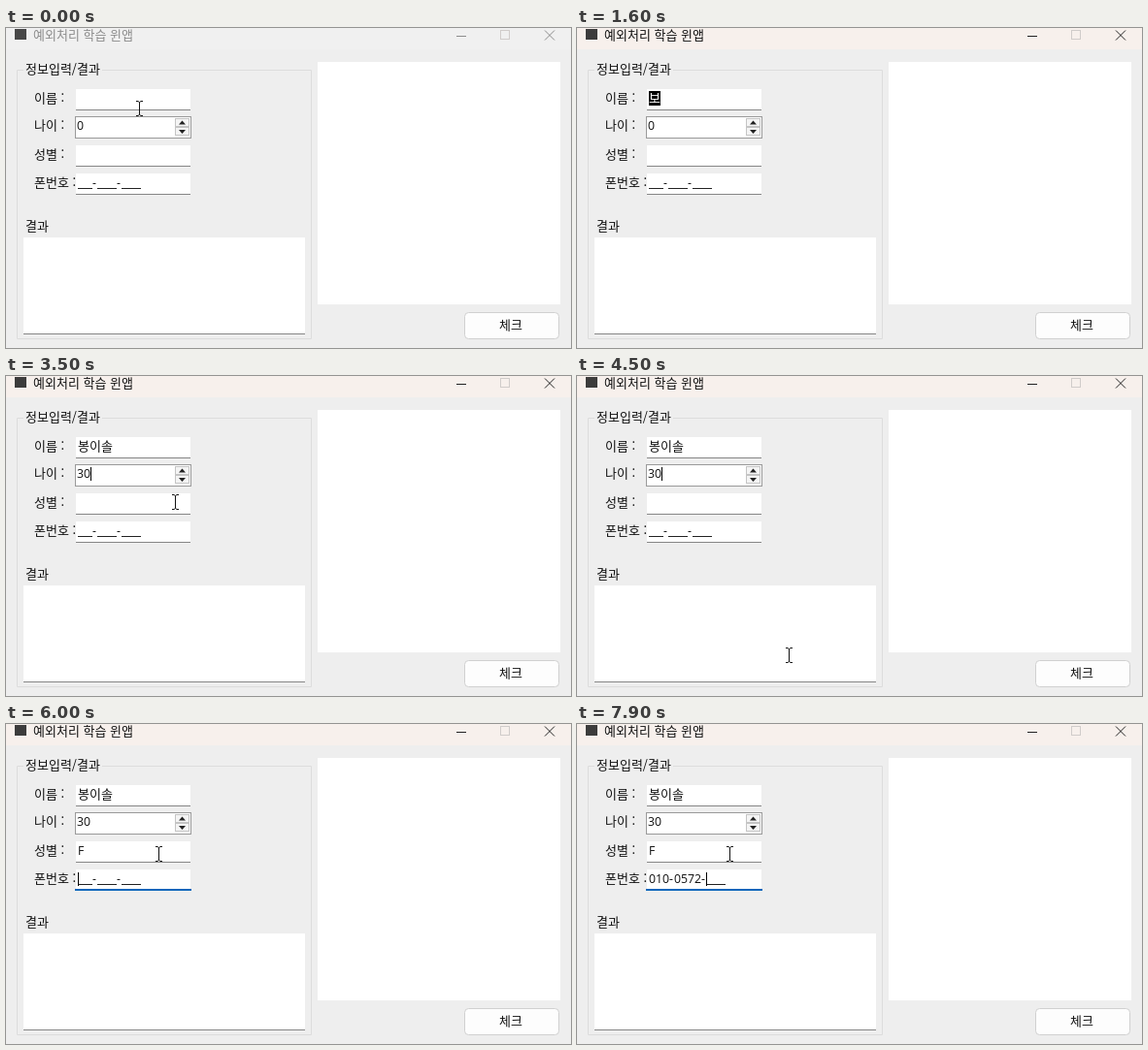
An HTML page that plays this animation: 582 by 330 pixels, repeating every 8000 ms.

```html
<!DOCTYPE html>
<html lang="ko">
<head>
<meta charset="utf-8">
<style>
  html, body { margin: 0; width: 100%; height: 100%; overflow: hidden; background: #eee; }
  svg { display: block; }
  text { font: 13px "Noto Sans CJK KR", "Noto Sans CJK", sans-serif; fill: #111; white-space: pre; }
  .num { font: 12.3px "Open Sans", "Noto Sans", sans-serif; }
  rect { shape-rendering: crispEdges; }
  .box { fill: #fff; }
  .edge { fill: #868686; }
  .line { fill: none; stroke: #111; }
</style>
</head>
<body>
<svg width="582" height="330" viewBox="0 0 582 330">
  <rect width="582" height="330" fill="#eee"/>
  <rect id="bar" width="582" height="22"/>
  <rect id="icon" x="9" y="1" width="12" height="11"/>
  <text id="title" x="28" y="12">예외처리 학습 윈앱</text>
  <g id="controls" fill="none">
    <path d="M464 8.5H474"/>
    <path d="M555 2.5L565 12.5M565 2.5L555 12.5"/>
  </g>
  <rect x="509.5" y="2.5" width="9" height="9" fill="none" stroke="#d0ccca"/>

  <path d="M18 43.5H11.5V320.5H314.5V43.5H99" fill="none" stroke="#dcdcdc"/>
  <text x="20" y="47">정보입력/결과</text>
  <text x="29" y="77">이름 :</text>
  <text x="29" y="105">나이 :</text>
  <text x="29" y="135">성별 :</text>
  <text x="29" y="164">폰번호 :</text>
  <text x="20" y="209">결과</text>

  <g id="inputs"></g>
  <rect x="71.5" y="91.5" width="119" height="22" fill="#fff" stroke="#9a9a9a"/>
  <g fill="#f4f4f4" stroke="#c4c4c4">
    <rect x="174.5" y="93.5" width="14" height="8"/>
    <rect x="174.5" y="102.5" width="14" height="8"/>
  </g>
  <path d="M178 99.5L181.5 95.5L185 99.5ZM178 105L181.5 109L185 105Z" fill="#222"/>
  <rect class="box" x="18" y="216" width="290" height="99"/>
  <rect class="edge" x="18" y="315" width="290" height="1"/>
  <rect class="box" x="321" y="35" width="250" height="250"/>
  <rect x="472.5" y="293.5" width="97" height="27" rx="4" fill="#fdfdfd" stroke="#d0d0d0" style="shape-rendering:auto"/>
  <text x="508" y="311">체크</text>

  <rect id="focus" x="71" width="120" height="2" fill="#0b66bb"/>
  <text id="name" x="74" y="77"></text>
  <rect id="block" y="65" width="12" height="15" fill="#000"/>
  <text id="jamo" y="77" style="fill:#fff"></text>
  <text id="age" class="num" x="73" y="105"></text>
  <text id="sex" class="num" x="74" y="135"></text>
  <text id="phone" class="num" y="164"></text>
  <path id="blanks" stroke="#222"/>
  <rect id="caret" width="1" height="14" fill="#000"/>
  <path id="beam" class="line" d="M-3 -7.5H-1L.5 -6.5L2 -7.5H4M.5 -6.5V6.5M-3 7.5H-1L.5 6.5L2 7.5H4"/>
</svg>
<script>
const $ = id => document.getElementById(id);
const LOOP = 8000, STEP = 100;

$('inputs').innerHTML = [63, 121, 150].map(y =>
  `<rect class="box" x="72" y="${y}" width="118" height="21"/>
   <rect class="edge" x="72" y="${y + 21}" width="118" height="1"/>`).join('');

// [time, committed name, syllable being composed]
const nameKeys = [
  [0, '', ''], [1400, '', 'ㅂ'], [1600, '', '보'], [1900, '', '봉'],
  [2400, '봉', 'ㅇ'], [2600, '봉', '이'], [2700, '봉이', 'ㅅ'],
  [2800, '봉이', '소'], [2900, '봉이', '솔'], [3100, '봉이솔', '']
];
const ageKeys = [[0, '0'], [3300, '3'], [3400, '30']];
const sexKeys = [[0, ''], [5300, 'F']];
const phoneKeys = [
  [0, ''], [6300, '0'], [6400, '01'], [6500, '010'], [7000, '0100'],
  [7200, '01005'], [7400, '010057'], [7600, '0100572']
];
const focusKeys = [[0, ''], [800, 'name'], [3100, 'age'], [5000, 'sex'], [5800, 'phone']];
const mouse = [
  [0, 137, 83], [400, 135, 74], [3300, 135, 74], [3600, 188, 150],
  [4100, 231, 270], [4400, 218, 288], [4600, 218, 288], [5000, 157, 134], [LOOP, 157, 134]
];

const last = (keys, t) => keys.filter(k => k[0] <= t).pop();

function mouseAt(t) {
  const i = mouse.findIndex(k => k[0] > t);
  const a = mouse[i - 1], b = mouse[i];
  const p = (t - a[0]) / (b[0] - a[0]), e = p * p * (3 - 2 * p);
  return [1, 2].map(n => Math.round(a[n] + (b[n] - a[n]) * e));
}

// Lays digits over the 000-0000-0000 mask; returns the caret position.
function drawPhone(digits) {
  let x = 74, n = 0, chars = '', xs = [], blanks = '', caret = x;
  for (const m of '000-0000-0000') {
    const c = m === '-' ? m : digits[n++];
    if (c) { chars += c; xs.push(x); }
    else blanks += `M${x} 165.5h5`;
    x += c && c !== '-' ? 7 : 5;
    if (m !== '-' && c) caret = x;
  }
  if (digits.length === 7) caret += 5;
  $('phone').textContent = chars;
  $('phone').setAttribute('x', xs.join(' '));
  $('blanks').setAttribute('d', blanks);
  return caret;
}

const show = (el, on) => el.setAttribute('visibility', on ? 'visible' : 'hidden');

function draw(t) {
  const active = t >= 300;
  $('bar').setAttribute('fill', active ? '#f7f0ec' : '#f0f0f0');
  $('title').style.fill = active ? '#111' : '#8c8c8c';
  $('icon').setAttribute('fill', active ? '#3c3c3c' : '#484848');
  $('controls').setAttribute('stroke', active ? '#222' : '#8c8c8c');

  const [nameTime, name, jamo] = last(nameKeys, t);
  const [ageTime, age] = last(ageKeys, t);
  const [sexTime, sex] = last(sexKeys, t);
  const [phoneTime, digits] = last(phoneKeys, t);
  const [focusTime, field] = last(focusKeys, t);
  $('name').textContent = name;
  $('jamo').textContent = jamo;
  $('jamo').setAttribute('x', 74 + 12 * name.length);
  $('block').setAttribute('x', 74 + 12 * name.length);
  show($('block'), jamo);
  $('age').textContent = age;
  $('sex').textContent = sex;
  const phoneCaret = drawPhone(digits);

  show($('focus'), field === 'sex' || field === 'phone');
  $('focus').setAttribute('y', field === 'sex' ? 141 : 170);

  const carets = {
    name: [74 + 12 * name.length, 65, nameTime],
    age: [73 + 7 * age.length, 94, ageTime],
    sex: [74 + 6 * sex.length, 124, sexTime],
    phone: [phoneCaret, 153, phoneTime]
  };
  const [x, y, typed] = carets[field] || [0, 0, 0];
  $('caret').setAttribute('x', x);
  $('caret').setAttribute('y', y);
  show($('caret'), field && !jamo && (t - Math.max(typed, focusTime)) % 1060 < 530);

  const typing = t >= 1400 && t < 3300 || t >= 5300 && t < 6000;
  show($('beam'), !typing);
  $('beam').setAttribute('transform', `translate(${mouseAt(t)})`);
}

const start = performance.now();
function tick() {
  const t = (performance.now() - start) % LOOP;
  draw(Math.floor(t / STEP) * STEP);
  requestAnimationFrame(tick);
}
tick();
</script>
</body>
</html>
```
